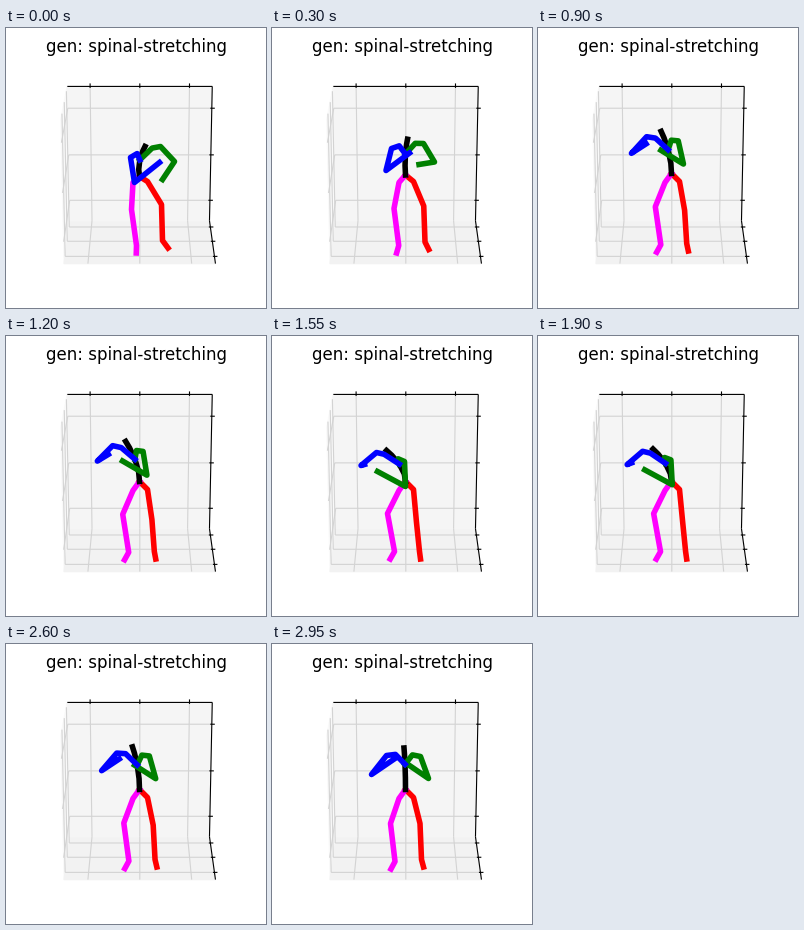
Recreate the animation shown at these times as a matplotlib script. Size 260x280 px, loop 3 s.

```python
import numpy as np
import matplotlib.pyplot as plt
from matplotlib.animation import FuncAnimation

W, H, DPI = 260, 280, 100
FRAMES, STEP = 60, 50

# View: 20 degrees above the floor, perspective camera at distance 10
CENTER = np.array([133.3, 144.6])
SCALE, DIST, TILT = 1244, 10, np.radians(20)
HALF = np.array([0.595, 0.595, 0.4464])
EDGE = 1.458  # half the data range along each axis

# Key points of a pose: back control and head, green arm, blue arm
# (shoulder, elbow, wrist), red leg, pink leg (knee, ankle)
UPRIGHT = np.array([(133, 121), (131.5, 103.5),
                    (148, 112), (156, 134), (137, 121),
                    (114, 111), (99, 130), (121, 115),
                    (147.5, 179), (149, 215), (118, 179), (122.5, 217)])
CROUCHED = np.array([(130, 134), (138.5, 118),
                     (154, 118), (168, 133), (156, 151),
                     (124, 129), (128, 154), (153, 134),
                     (155, 176), (156, 212), (125, 181), (130, 217)])
BENT = np.array([(133, 130), (114, 114),
                 (132, 125), (133, 150), (105, 135),
                 (104, 116), (88.5, 129), (92, 128),
                 (144, 186), (147, 215), (115, 177), (122, 215)])
HIPS = np.array([(141, 153), (126.5, 154)])


def project(x, y, z):
    """Box point (data units, box center at 0) to pixels."""
    x, y, z = np.array([x, y, z]) / EDGE * HALF
    up = y * np.cos(TILT) - z * np.sin(TILT)
    near = y * np.sin(TILT) + z * np.cos(TILT)
    return CENTER + SCALE * np.array([x, -up]) / (DIST - near)


def ramp(t, start, end):
    s = np.clip((t - start) / (end - start), 0, 1)
    return s * s * (3 - 2 * s)


def curve(a, b, c, u):
    u = np.array(u)[:, None]
    return (1 - u) ** 2 * a + 2 * u * (1 - u) * b + u * u * c


def arm(chest, up, shoulder, elbow, wrist):
    collar = (chest + shoulder) / 2 + 5.5 * up
    return [chest, collar, shoulder, elbow, wrist]


def leg(root, hip, knee, ankle):
    foot = ankle + [(ankle[0] - hip[0] - 4) / 2, 7.5]
    return [root, hip, knee, ankle, foot]


def skeleton(t):
    """Rise from a crouch, lean over in two stages, hold, straighten up."""
    crouch = max(0, 1 - t / 600)
    lean = (0.42 * ramp(t, 600, 950) + 0.58 * ramp(t, 1000, 1550)
            - 0.1 * ramp(t, 1600, 2200) - 0.9 * ramp(t, 2200, 2800))
    p = UPRIGHT + crouch * (CROUCHED - UPRIGHT) + lean * (BENT - UPRIGHT)
    p[1:8] -= 4 * lean * (1 - lean) * np.array([2, 5])  # swing up midway

    root = np.array([133, 145 + 3 * crouch])
    back = curve(root, p[0], p[1], [0, 0.25, 0.57, 0.85, 1])
    chest = back[2]
    up = (p[1] - chest) / np.hypot(*(p[1] - chest))
    return [leg(root, HIPS[0], *p[8:10]), leg(root, HIPS[1], *p[10:12]),
            back, arm(chest, up, *p[2:5]), arm(chest, up, *p[5:8])]


fig = plt.figure(figsize=(W / DPI, H / DPI), dpi=DPI, facecolor="white")
ax = fig.add_axes([0, 0, 1, 1])
ax.set_xlim(-0.5, W - 0.5)
ax.set_ylim(H - 0.5, -0.5)
ax.axis("off")
ax.text(130, 23.5, "gen: spinal-stretching", fontsize=12, ha="center",
        va="baseline", family="DejaVu Sans")


def segment(p, q, color):
    ax.plot(*zip(p, q), color=color, lw=0.8, snap=False,
            solid_capstyle="butt", zorder=1)


def pane(corners, gray):
    ax.fill(*zip(*[project(*c) for c in corners]), facecolor=gray,
            edgecolor=gray, lw=1, zorder=0)


def draw_box():
    e = EDGE
    pane([(-e, -e, -e), (-e, e, -e), (-e, e, e), (-e, -e, e)], "0.975")
    pane([(-e, -e, -e), (e, -e, -e), (e, -e, e), (-e, -e, e)], "0.95")
    pane([(-e, -e, -e), (e, -e, -e), (e, e, -e), (-e, e, -e)], "0.9625")

    for v in (-1, 0, 1):
        for path in ([(v, e, -e), (v, -e, -e), (v, -e, e)],
                     [(-e, v, e), (-e, v, -e), (e, v, -e)],
                     [(-e, e, v), (-e, -e, v), (e, -e, v)]):
            a, b, c = [project(*q) for q in path]
            segment(a, b, "#d3d3d3")
            segment(b, c, "#d3d3d3")

    corners = [project(*q) for q in
               [(-e, e, -e), (e, e, -e), (e, -e, -e), (e, -e, e)]]
    for p, q in zip(corners, corners[1:]):
        segment(p, q, "black")

    for v in (-1, 0, 1):
        x, y = project(v, e, -e)
        segment((x, y - 3), (x, y + 1.5), "black")
        for q in ((e, v, -e), (e, -e, v)):
            x, y = project(*q)
            segment((x - 1.5, y), (x + 3, y), "black")


draw_box()

bones = [ax.plot([], [], color=c, lw=4, solid_capstyle="projecting",
                 solid_joinstyle="round", zorder=2)[0]
         for c in ("red", "magenta", "black", "green", "blue")]


def update(i):
    for bone, chain in zip(bones, skeleton(i * STEP)):
        bone.set_data(*zip(*chain))
    return bones


anim = FuncAnimation(fig, update, frames=FRAMES, interval=STEP, repeat=True,
                     repeat_delay=0)
plt.show()
```
